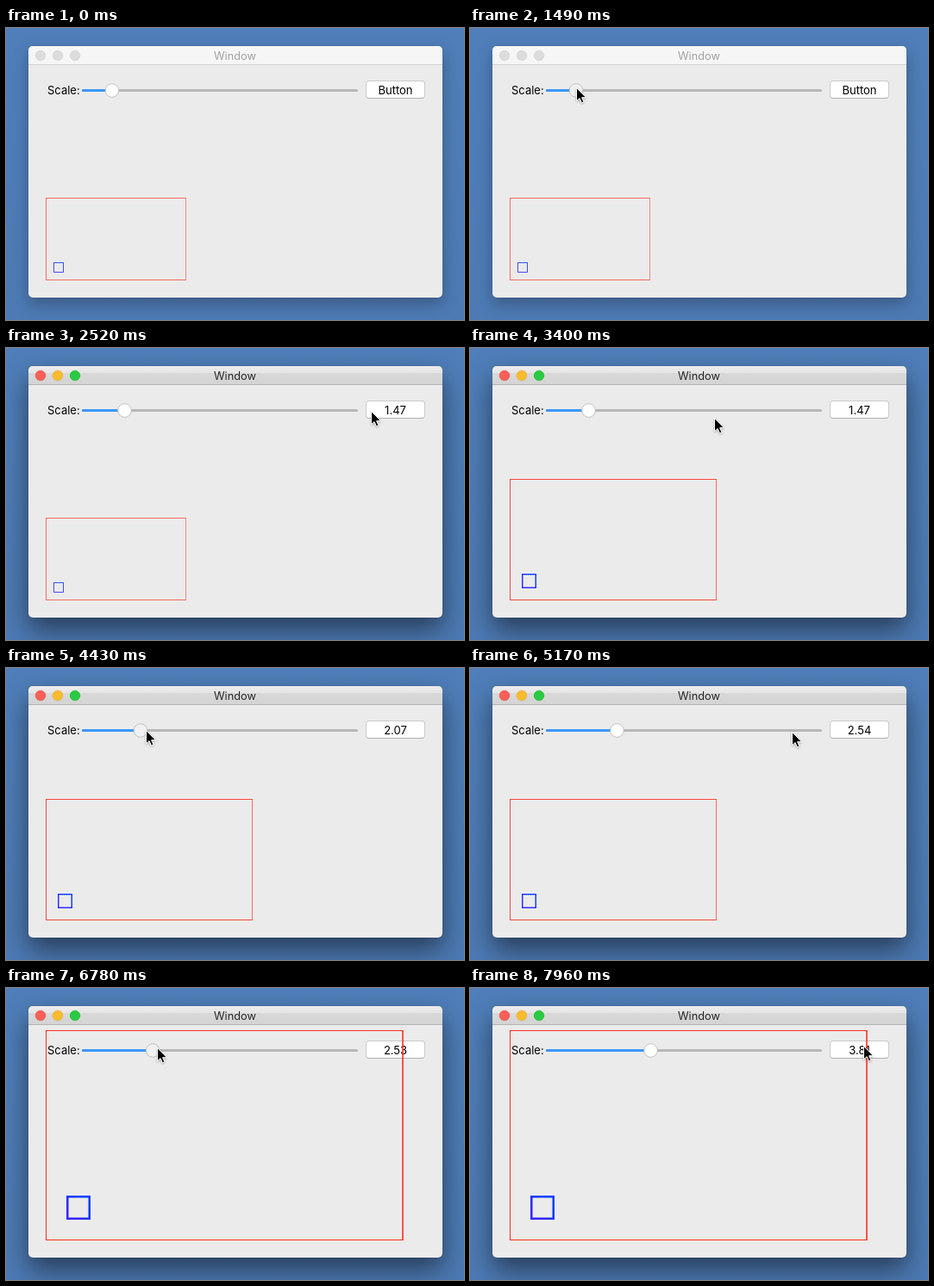
An HTML page that plays this animation: 531 by 339 pixels, repeating every 8 s.

```html
<!DOCTYPE html>
<html lang="en">
<head>
<meta charset="utf-8">
<title>Scale demo</title>
<style>
  html, body { margin: 0; width: 100%; height: 100%; overflow: hidden; background: #4f7db7; }
  #stage { position: relative; width: 531px; height: 339px; overflow: hidden;
    background: linear-gradient(#4f7eb9, #4d7ab3);
    font: 13px Inter, Roboto, sans-serif; color: #000; }
  #window { position: absolute; left: 26px; top: 21px; width: 480px; height: 292px;
    border-radius: 5px; background: #ebebeb;
    box-shadow: 0 0 1px rgba(0,0,0,.35), 0 7px 18px rgba(0,0,0,.27); }
  #bar { height: 21px; border-bottom: 1px solid #d3d3d3; border-radius: 5px 5px 0 0;
    background: #f6f6f6; color: #a2a2a2; font-size: 12.8px; line-height: 23px;
    text-align: center; padding-right: 1px; }
  .active #window { box-shadow: 0 0 1px rgba(0,0,0,.5), 0 14px 30px rgba(0,0,0,.5); }
  .active #bar { border-color: #b4b4b4; color: #262626;
    background: linear-gradient(#ececec, #e5e5e5 36%, #d8d8d8 38%, #d4d4d4); }
  svg { position: absolute; left: 0; top: 0; }
  .light { fill: #dcdcdc; stroke: #cecece; stroke-width: .6; }
  .active .light { fill: var(--on); stroke: var(--rim); }
  #label { position: absolute; left: 48px; top: 64px; line-height: 17px; }
  #button { position: absolute; left: 417px; top: 61px; width: 67px; height: 19px;
    border: 1px solid #cacaca; border-bottom-color: #b3b3b3; border-radius: 4px;
    background: #fff; text-align: center; line-height: 20px; }
  #frame rect { fill: #ff2a1a; }
</style>
</head>
<body>
<div id="stage">
  <div id="window"><div id="bar">Window</div></div>
  <div id="label">Scale:</div>
  <div id="button">Button</div>
  <svg width="531" height="339">
    <defs>
      <linearGradient id="blue" x1="0" y1="1" x2="1" y2="0">
        <stop offset=".3" stop-color="#3428ff"/><stop offset=".7" stop-color="#0a40ff"/>
      </linearGradient>
      <filter id="soft" x="-50%" y="-50%" width="200%" height="200%">
        <feDropShadow dx="0" dy="1" stdDeviation=".8" flood-opacity=".35"/>
      </filter>
    </defs>
    <circle class="light" cx="40" cy="32" r="5.8" style="--on:#ff5f57;--rim:#e2463f"/>
    <circle class="light" cx="60" cy="32" r="5.8" style="--on:#fdbb2e;--rim:#e0a125"/>
    <circle class="light" cx="80" cy="32" r="5.8" style="--on:#27cb40;--rim:#1dad2b"/>
    <rect x="88" y="71" width="320" height="3" rx="1.5" fill="#b7b7b7"/>
    <rect id="fill" x="88" y="71" height="3" rx="1.5" fill="#3b97fb"/>
    <circle id="knob" cy="72.5" r="7.8" stroke="#b5b5b5" stroke-width=".8"/>
    <g id="frame">
      <rect id="left"/><rect id="bottom"/><rect id="top"/><rect id="right" opacity=".78"/>
    </g>
    <rect id="square" fill="none" stroke="url(#blue)"/>
    <path id="cursor" d="M0 0V15.3L3.6 12.1 5.9 17.4 8.4 16.3 6.1 11.2H11Z"
      fill="#000" stroke="#fff" filter="url(#soft)"/>
  </svg>
</div>
<script>
const LOOP = 8000, STEP = 147.3;
const ORIGIN = { x: 46, y: 293 };
const ENTER = 2;

// Each cycle drags the knob, carries the cursor to the button and clicks there.
const REST = { x: 147, y: 53, click: 4, to: 1 };
const CYCLES = [
  { grab: 10, release: 14, arrive: 17, click: 18, from: 1,    to: 1.47, grip: 0, x: 423, y: 74 },
  { grab: 28, release: 32, arrive: 36, click: 38, from: 1.47, to: 2.54, grip: 6, x: 439, y: 65 },
  { grab: 46, release: 49, arrive: 52, click: 55, from: 2.53, to: 3.81, grip: 5, x: 456, y: 68 }
];

const $ = id => document.getElementById(id);
const set = (id, attrs) => {
  for (const name in attrs) $(id).setAttribute(name, attrs[name]);
};
const box = (id, x, y, width, height) => set(id, { x, y, width, height });
const progress = (t, a, b) => Math.min(1, Math.max(0, (t - a) / (b - a)));
const mix = (a, b, k) => a + (b - a) * k;
const knobAt = value => 92.2 + 30.8 * value;

// Straight glide with a slight downward bow.
const glide = (a, b, k) => ({
  x: mix(a.x, b.x, k),
  y: mix(a.y, b.y, k) + 10 * Math.sin(Math.PI * k)
});

function poseAt(step) {
  const index = CYCLES.findIndex(cycle => step < cycle.click);
  const cycle = CYCLES[index], last = CYCLES[index - 1] || REST;
  const pull = progress(step, cycle.grab, cycle.release) ** 0.835;
  const value = step < cycle.grab ? last.to : mix(cycle.from, cycle.to, pull);
  const hand = { x: knobAt(value) + cycle.grip, y: 70 + 5 * pull };
  const cursor = step < cycle.release
    ? glide(last, hand, progress(step, last.click, cycle.grab))
    : glide(hand, cycle, progress(step, cycle.release, cycle.arrive));
  cursor.y -= 48 * Math.max(0, ENTER + 1 - step);
  const dragging = step >= cycle.grab && step < cycle.release;
  return { value, cursor, dragging, scale: last.to };
}

function drawFrame(scale) {
  const width = Math.round(163 * scale), height = Math.round(96 * scale);
  const { x, y } = ORIGIN, topY = y - height;
  box('left', x, topY, 1, height);
  box('bottom', x, y - 1, width, 1);
  box('top', x, topY, width, 1);
  box('right', x + width - 1, topY, Math.round(scale * .8), height);
  set('frame', { opacity: Math.min(1, .25 + .4 * scale) });

  const inset = Math.floor(9.6 * scale), size = Math.round(10.9 * scale + .7);
  box('square', x + inset + scale / 2, y - inset - size + scale / 2, size - scale, size - scale);
  set('square', { 'stroke-width': scale, opacity: Math.min(1, .5 + .35 * scale) });
}

function render(time) {
  const step = Math.floor(time / STEP);
  const { value, cursor, dragging, scale } = poseAt(step);
  const active = step > CYCLES[0].grab;

  $('stage').classList.toggle('active', active);
  $('button').textContent = active ? value.toFixed(2) : 'Button';
  set('fill', { width: knobAt(value) - 88 });
  set('knob', { cx: knobAt(value), fill: dragging ? '#f1f1f1' : '#fff' });
  set('cursor', {
    transform: `translate(${Math.round(cursor.x) + .5} ${Math.round(cursor.y) - .5})`,
    visibility: step < ENTER ? 'hidden' : 'visible'
  });
  drawFrame(scale);
}

const start = performance.now();
function tick() {
  render((performance.now() - start) % LOOP);
  requestAnimationFrame(tick);
}
tick();
</script>
</body>
</html>
```
